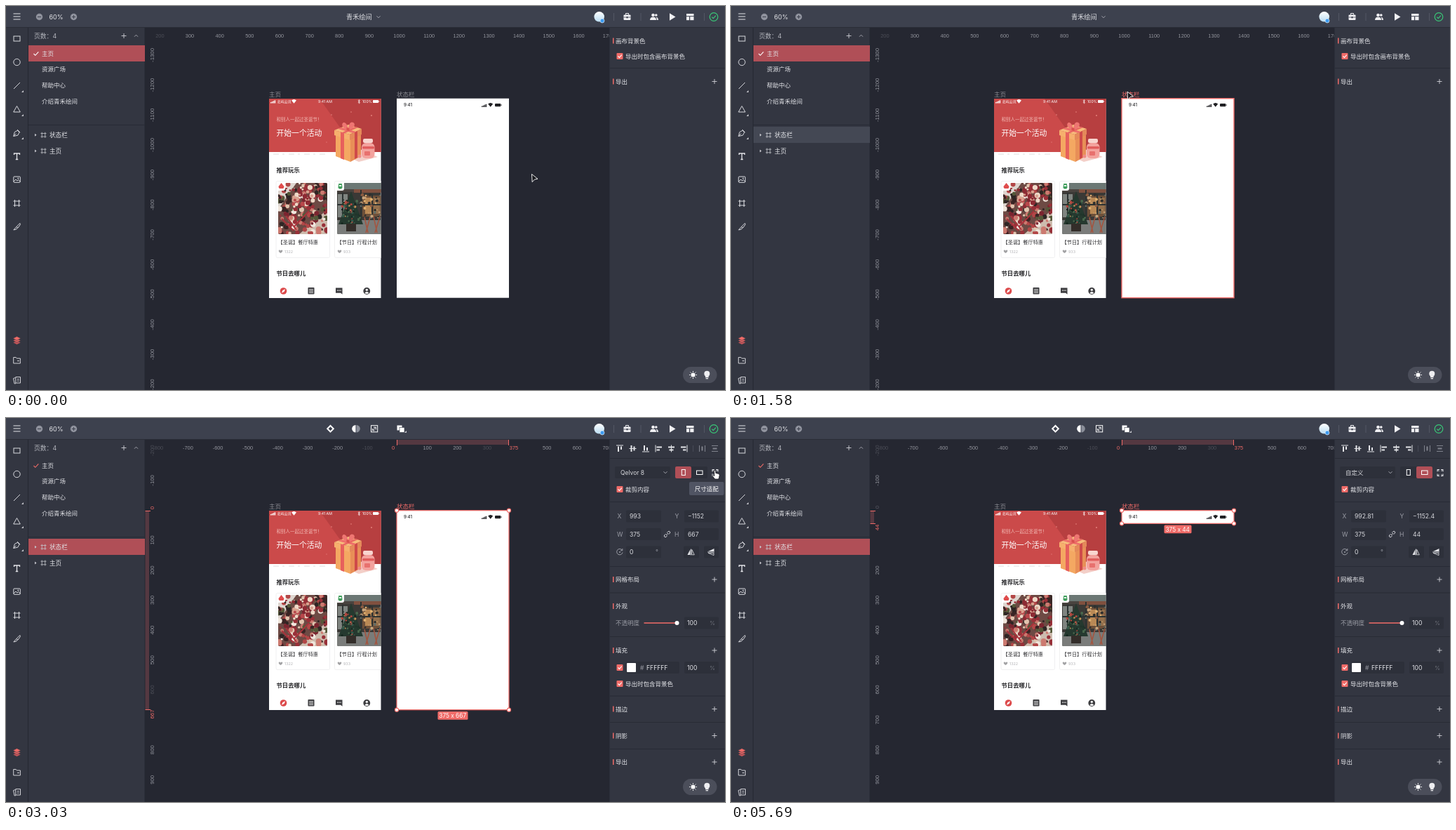
An HTML page that plays this animation: 1025 by 547 pixels, repeating every 5790 ms.

```html
<!DOCTYPE html>
<html lang="zh-CN">
<head>
<meta charset="utf-8">
<title>Design editor</title>
<style>
html, body { margin: 0; width: 100%; height: 100%; overflow: hidden; background: #252731; }
svg { display: block; width: 1025px; height: 547px; }
text { font-family: Inter, "Noto Sans CJK SC", "Noto Sans CJK", sans-serif; white-space: pre; }
.ruler text { font-family: "Liberation Sans", sans-serif; }
</style>
</head>
<body>
<svg id="stage" viewBox="0 0 1025 547"></svg>
<script>
const LOOP = 5790;
const RED = '#f06b68', ROW = '#b04f57', PANEL = '#333641', FIELD = '#2d303a';
const LIGHT = '#e3e4e8', MUTED = '#9a9ca5', EDGE = '#252832', BAND = '#553841';

const rect = (x, y, w, h, fill, extra = '') =>
  `<rect x="${x}" y="${y}" width="${w}" height="${h}" fill="${fill}" ${extra}/>`;
const circle = (x, y, r, fill, extra = '') => `<circle cx="${x}" cy="${y}" r="${r}" fill="${fill}" ${extra}/>`;
const shape = (d, fill, extra = '') => `<path d="${d}" fill="${fill}" ${extra}/>`;
const line = (d, color = LIGHT, width = 1, extra = '') =>
  `<path d="${d}" fill="none" stroke="${color}" stroke-width="${width}" ${extra}/>`;
const text = (x, y, s, size = 8.5, fill = LIGHT, extra = '') =>
  `<text x="${x}" y="${y + size * 0.37}" font-size="${size}" fill="${fill}" ${extra}>${s}</text>`;
const group = (id, body, extra = '') => `<g id="${id}" ${extra}>${body}</g>`;
const at = (x, y, body, extra = '') => `<g transform="translate(${x} ${y})" ${extra}>${body}</g>`;
const MID = 'text-anchor="middle"', BOLD = 'font-weight="600"', MEDIUM = 'font-weight="500"';

const plus = (x, y) => line(`M${x - 3.5} ${y}h7M${x} ${y - 3.5}v7`, '#d0d1d6', 0.9);
const chevron = (x, y, dir = 1) => line(`M${x - 2.5} ${y - dir * 1.2}l2.5 ${dir * 2.5}l2.5 ${-dir * 2.5}`, '#b0b2ba', 0.9);
const check = (x, y) => rect(x - 4.5, y - 4.5, 9, 9, RED, 'rx="1"') + line(`M${x - 2.5} ${y}l2 2l3.2-3.8`, '#fff', 1.1);
const field = (x, y, w) => rect(x, y - 8.5, w, 17, FIELD, 'rx="2"');
const rule = y => rect(861, y, 164, 1, '#282b35');
const section = (y, name, add = true) =>
  rect(865, y - 4, 1.5, 8, RED) + text(869, y, name, 8.5) + (add ? plus(1010, y) : '');

// Ruler labels; `place` maps a design unit to a stage coordinate.
function ruler(from, to, place, vertical, dim = [], skip = []) {
  let out = '';
  for (let n = from; n <= to; n += 100) {
    if (skip.includes(n)) continue;
    const fade = `opacity="${dim.includes(n) ? 0.35 : 1}"`;
    out += rulerLabel(place(n), n, vertical, '#92949c', fade);
  }
  return out;
}
function rulerLabel(p, n, vertical, fill, extra = '') {
  return vertical
    ? `<g transform="translate(208.5 ${p}) rotate(-90)">${text(0, 0, n, 7.8, fill, MID + extra)}</g>`
    : text(p, 42, n, 7.4, fill, MID + extra);
}

const SCALE = 0.4265;
const rulers =
  group('rulersPage',
    ruler(200, 1700, n => 262 + (n - 300) * SCALE, false, [200]) +
    ruler(-1300, -200, n => 70 + (n + 1300) * SCALE, true), 'class="ruler"') +
  group('rulersFrame',
    rect(557, 31, 160, 7, BAND) + line('M557.5 31v8M716.5 31v8', RED) +
    ruler(-800, 700, n => 558 + n * SCALE, false, [-800, -100, 300], [0, 400]) +
    rulerLabel(552, 0, false, RED) + rulerLabel(724, 375, false, RED) +
    ruler(-200, 900, n => 131.5 + n * SCALE, true, [-200, 600], [0, 100, 600, 700]), 'class="ruler"') +
  group('rulerTall',
    rect(198, 132, 6, 284, BAND) + line('M198 132.5h8M198 415.5h8', RED) +
    rulerLabel(128, 0, true, RED) + rulerLabel(174, 100, true, '#92949c') +
    rulerLabel(387, 600, true, '#92949c', 'opacity=".35"') + rulerLabel(422, 667, true, RED), 'class="ruler"') +
  group('rulerShort',
    rect(198, 132, 6, 18.5, BAND) + line('M198 132.5h8M198 150.5h8', RED) +
    rulerLabel(127, 0, true, '#92949c', 'opacity=".45"') + rulerLabel(156, 44, true, RED) +
    rulerLabel(387, 600, true, '#92949c') + rulerLabel(430, 700, true, '#92949c'), 'class="ruler"');

function seeded(seed) {
  return () => (seed = seed * 16807 % 2147483647) / 2147483647;
}
function blobs(seed, count, x, y, w, h, radius, colors) {
  const rnd = seeded(seed);
  let out = '';
  for (let i = 0; i < count; i++)
    out += circle((x + rnd() * w).toFixed(1), (y + rnd() * h).toFixed(1),
      (radius * (0.5 + rnd())).toFixed(1), colors[Math.floor(rnd() * colors.length)]);
  return out;
}

const signal = (x, y, c) => [0, 1, 2, 3].map(i => rect(x + i * 1.9, y + 2 - i * 0.9, 1.4, 1.5 + i * 0.9, c)).join('');
const wifi = (x, y, c) => shape(`M${x - 3.5} ${y - 1.5}q3.5-3 7 0L${x} ${y + 2.8}z`, c);
const heart = (x, y) => shape(`M${x} ${y + 2.5}c-5-3-2-6.3 0-3.6c2-2.7 5 .6 0 3.6z`, '#a3a3a5');

const gift =
  shape('M474 209l24-8l32 14l-27 7z', '#f3cfc8') +
  shape('M470 183l21 7v32l-21-8z', '#f4a862') + shape('M491 190l15-7v31l-15 8z', '#e88f57') +
  shape('M468 177l20-8l19 6l-17 8z', '#f7bd7c') +
  shape('M468 177l22 6v8l-22-7z', '#f6b06d') + shape('M490 183l17-8v8l-17 8z', '#e4895a') +
  shape('M477 179.5l5 1.5v38l-5-2z', '#e7605c') + shape('M497 180l4-2v38l-4 2z', '#cf4a4a') +
  shape('M473 175l5-2l21 6l-4 2z', '#ee6f6a') + shape('M498 172l4 1l-21 9l-4-1z', '#e86762') +
  shape('M488 176c-8 0-11-8-7-10c4-1 6 5 7 9c1-7 3-11 7-9c5 3-1 10-7 10z', '#ee7672') +
  shape('M485.5 173l4 1v4l-4-1z', '#d9504e') +
  rect(507, 195, 18.5, 22, '#f3a29d', 'rx="6"') + rect(509, 189, 14, 6, '#f8d5cf', 'rx="2"') +
  rect(508, 200, 17, 3.5, '#e15e5d', 'rx="1.5"') + rect(511, 207, 8, 6, '#e8716e', 'rx="1"') +
  circle(504, 214, 2.5, '#ef8c86');

const foodPhoto = `<g clip-path="url(#foodClip)">` +
  rect(388, 252, 70, 73, '#6d4a44') + shape('M388 252h26l-26 38z', '#ded6d0') +
  shape('M458 290v35h-40z', '#cdbcae') + shape('M440 252h18v26z', '#3b2a28') +
  blobs(31, 210, 388, 252, 70, 73, 2.6,
    ['#7b2530', '#b34747', '#3a2424', '#e0c4ae', '#555839', '#cc7a70', '#f0e6dc', '#2e2524', '#983038']) +
  blobs(77, 34, 410, 258, 28, 28, 2.8, ['#d9a28f', '#b8474b', '#efd9c8', '#8d2a33']) +
  line('M393 303l17 17M399 299l15 20M411 314l21-22', '#a9323b', 2) + '</g>';

const shopPhoto = `<g clip-path="url(#shopClip)">` +
  rect(472, 252, 63, 73, '#3b3936') + rect(472, 252, 63, 9, '#6b7774') + rect(472, 261, 63, 4, '#4a4440') +
  rect(496, 261, 39, 5, '#80503f') + rect(473, 268, 14, 33, '#7f8480') + rect(508, 270, 27, 30, '#6e5039') +
  rect(512, 273, 9, 23, '#b98955') + rect(524, 273, 9, 23, '#94704d') +
  line('M480 266v38M506 262v44M522 268v34M472 283h63', '#2c3232', 2) +
  blobs(19, 40, 506, 268, 29, 34, 1.5, ['#e0b070', '#2e2f2e', '#8a5b42', '#5d6c68', '#c9a57c']) +
  rect(472, 305, 63, 20, '#7a7c7a') +
  line('M511 301l5 22M519 301l-6 22M524 300l5 23M533 300l-7 23', '#a35540', 1.6) +
  shape('M492 264l-18 47h35z', '#25392f') +
  blobs(57, 80, 479, 276, 26, 36, 1.3, ['#36594a', '#b8473f', '#16261f', '#c98f58', '#4b6a4e', '#20342a']) +
  rect(485, 310, 14, 11, '#332d29') + '</g>';

const navIcons =
  circle(395.5, 406, 4.8, '#dc4a4b') + shape('M398.2 403.3l-1.6 3.8l-3.8 1.6l1.6-3.8z', '#fff') +
  rect(430.5, 401, 9, 9.5, '#3d3d40', 'rx=".8"') + line('M432 403.8h6M432 406h6M432 408.2h6', '#fff', 0.9) +
  shape('M470 401.5h9.5v9.2l-2.4-2h-7.1z', '#3d3d40') + line('M472 405.2h1.3M474.2 405.2h1.3M476.4 405.2h1.3', '#fff', 1.2) +
  circle(514.3, 406, 4.9, '#3d3d40') + circle(514.3, 404.3, 1.6, '#fff') + shape('M511.3 408.9q3-3.6 6 0q-3 2-6 0z', '#fff');

const phone = `<g clip-path="url(#phoneClip)">` +
  rect(375, 132, 160, 284, '#fff') + rect(375, 132, 160, 76, '#cb4a4a') +
  shape('M447 132H535V208H501z', '#b73f40') +
  circle(464, 155, 0.8, '#e98a82') + circle(521, 156, 0.9, '#e98a82') + circle(457, 194, 0.8, '#e0716e') + circle(492, 151, 0.8, '#e98a82') +
  line('M381 211h79', '#d9d5d5', 0.8, 'stroke-dasharray="8 5 3 6"') +
  signal(377, 135, '#fff') + text(386.5, 136.2, '北屿云讯', 5, '#fff', MEDIUM) + wifi(410.5, 136, '#fff') +
  text(455, 136.3, '9:41 AM', 5.2, '#fff', MID) + line('M502 134l2.5 4l-1.2 1v-5.5l1.2 1l-2.5 3.5', '#fff', 0.6) +
  text(508, 136.3, '100%', 5.2, '#fff') + rect(523, 134, 8, 4, '#fff', 'rx=".8"') + rect(531.4, 135.2, 0.8, 1.6, '#fff') +
  text(385.5, 162, '和别人一起过圣诞节！', 6.5, '#f2b9b3') + text(385.5, 181, '开始一个活动', 10.8, '#fff', MEDIUM) + gift +
  text(385.5, 234, '推荐玩乐', 8.3, '#28282b', BOLD) +
  rect(385, 249.5, 76.5, 109, '#fff', 'rx="2" stroke="#ececee" stroke-width=".8"') +
  rect(468.5, 249.5, 76.5, 109, '#fff', 'rx="2" stroke="#ececee" stroke-width=".8"') +
  foodPhoto + shopPhoto +
  shape('M387 251h11v9q0 3-3 3h-8z', '#fff') + shape('M392.5 252l4 5q0 2-1.3 3h-5.4q-1.3-1-1.3-3z', '#df4c4c') +
  shape('M471 251h11v9q0 3-3 3h-8z', '#fff') + shape('M474.3 253h4.5l.7 5.5l-1.3 2h-3.4l-1.3-2z', '#3f9d5b') + rect(475, 255, 3, 2, '#fff') +
  text(387.5, 336.5, '【圣诞】餐厅特惠', 7.2, '#303033') + text(471.5, 336.5, '【节日】行程计划', 7.2, '#303033') +
  heart(391.5, 349.5) + text(397, 350, '1322', 5.4, '#b2b2b5') + heart(475.5, 349.5) + text(481, 350, '933', 5.4, '#b2b2b5') +
  text(385.5, 381, '节日去哪儿', 8.4, '#28282b', BOLD) + navIcons + '</g>';

const FRAME = { x: 557, y: 131.7, w: 160, tall: 284, short: 18.6 };
const outline = (h, width) => rect(FRAME.x, FRAME.y, FRAME.w, h, 'none', `stroke="${RED}" stroke-width="${width}"`);
function selection(h, size, badgeWidth) {
  const { x, y, w } = FRAME;
  const handles = [[x, y], [x + w, y], [x, y + h], [x + w, y + h]];
  return outline(h, 1.2) +
    handles.map(([cx, cy]) => circle(cx, cy, 2.6, '#fff', `stroke="${RED}" stroke-width="1.1"`)).join('') +
    rect(x + w / 2 - badgeWidth / 2, y + h + 2.3, badgeWidth, 11.7, RED, 'rx="1.5"') +
    text(x + w / 2 - 0.3, y + h + 8.2, size, 8.3, '#fff', MID);
}

const artboards =
  text(375, 126, '主页', 8.5, '#898a91') + phone +
  text(557, 126, '状态栏', 8.5, '#898a91', 'id="frameName"') +
  rect(FRAME.x, FRAME.y, FRAME.w, FRAME.tall, '#fff', 'id="frameBox"') +
  text(567, 141.2, '9:41', 6, '#202023', MEDIUM) +
  signal(678, 140.5, '#202023') + wifi(690.7, 141, '#202023') +
  rect(697, 139, 8.3, 4.3, '#202023', 'rx="1"') + rect(705.7, 140.2, 0.8, 1.8, '#202023') +
  group('hoverBar', outline(FRAME.short, 1.4)) + group('hoverFrame', outline(FRAME.tall, 1.4)) +
  group('pickTall', selection(FRAME.tall, '375 x 667', 43)) + group('pickShort', selection(FRAME.short, '375 x 44', 39));

const corner = (x, y) => shape(`M${x} ${y}v-3l-3 3z`, '#c9cad0');
const tools =
  rect(0, 31, 31, 516, PANEL) + rect(31, 31, 1, 516, EDGE) +
  rect(11, 43, 9, 7, 'none', 'stroke="#d8d9de"') + circle(15.5, 80, 4.7, 'none', 'stroke="#d8d9de"') +
  line('M11 118l9-9', '#d8d9de') + corner(25, 123) + line('M15.5 142.5l4.8 8.5h-9.6z', '#d8d9de') + corner(25, 157) +
  line('M10.8 185.5l1.5-6l4.2-2.2l2.6 2.6l-2.2 4.2zM10.8 185.5l3.6-3.7M16 176l4.2 4.2', '#d8d9de') + corner(25, 190) +
  line('M11.5 212v-2h8v2M15.5 210v8.5M13.8 218.5h3.4', LIGHT, 1.3) +
  rect(10.8, 243, 9.5, 8.3, 'none', 'rx="1" stroke="#d8d9de"') + line('M11 250l3-3l2 2l1.5-1.5l2.8 2.8', '#d8d9de') + circle(17.3, 245.5, 0.9, '#d8d9de') +
  line('M12.5 276v10M18.5 276v10M10.5 278h10M10.5 284h10', '#d8d9de') +
  line('M10.8 319l5-5.5l4-4l.6 1.8l-3.4 4.8l-2-1.5M10.8 319l4-1l1.5-2', '#d8d9de') +
  [483, 480, 477].map((y, i) => shape(`M10 ${y - 3.5}l5.5-2.8l5.5 2.8l-5.5 2.8z`, ['#c9565a', '#dd6262', RED][i], `stroke="${PANEL}" stroke-width=".5"`)).join('') +
  line('M10.7 500.5h3.5l1.2 1.5h5v7h-9.7zM16 505.5h3', '#d0d1d6') +
  line('M13.8 528.5h6.7v8.5h-6.7zM13.5 529.5l-3 1l1.6 7.5l2-.4M16 531.5h2.5M16 534h2.5', '#d0d1d6');

const pageNames = ['主页', '资源广场', '帮助中心', '介绍青禾绘间'];
const layer = (y, name) =>
  shape(`M41 ${y - 2}l2.6 2l-2.6 2z`, '#c5c6cc') +
  line(`M51.2 ${y - 4}v8M55.8 ${y - 4}v8M49.5 ${y - 2.3}h8M49.5 ${y + 2.3}h8`, '#c5c6cc', 0.8) + text(62, y, name, 8.6);
const leftPanel =
  rect(32, 31, 166, 516, PANEL) + rect(197.5, 31, 1, 516, EDGE) +
  text(40, 42.5, '页数：4', 8.8, '#b5b7be') + plus(168, 42.5) + chevron(185.5, 42.5, -1) +
  group('pageRow', rect(32, 56, 166, 23, ROW)) +
  group('layerHover', rect(32, 172, 166, 23, '#444854')) + group('layerRow', rect(32, 172, 166, 23, ROW)) +
  group('tickWhite', line('M39.5 68l2.3 2.3l4.5-5', '#fff', 1.1)) + group('tickRed', line('M39.5 68l2.3 2.3l4.5-5', RED, 1.1)) +
  pageNames.map((name, i) => text(51, 67.5 + i * 22.8, name, 8.5)).join('') +
  rect(32, 169, 166, 1, '#282b35') + layer(183.8, '状态栏') + layer(206.5, '主页');

const topBar =
  rect(0, 0, 1025, 31, '#3d414e') + rect(0, 30, 1025, 1, '#2a2d37') +
  line('M10.5 11h10M10.5 15h10M10.5 19h10') +
  circle(47.5, 15.5, 4.7, '#8f929d') + line('M45 15.5h5', '#3d414e') + text(71.5, 15.5, '60%', 9, LIGHT, MID) +
  circle(96.5, 15.5, 4.7, '#8f929d') + line('M94 15.5h5M96.5 13v5', '#3d414e') +
  group('docTitle', text(485, 15.5, '青禾绘间', 9.2) + chevron(531, 15.5)) +
  group('frameTools',
    line('M462.5 11l4.3 4.3l-4.3 4.3l-4.3-4.3z', '#fff', 2) +
    shape('M498.5 10a5.3 5.3 0 0 0 0 10.6z', '#fff') + shape('M499.5 10a5.3 5.3 0 0 1 0 10.6z', '#8a8e99') +
    rect(520.5, 10.7, 9.2, 9.2, 'none', 'stroke="#fff"') + line('M524 13.2h3.3v3.3M522.6 15v2.8h2.8M526.8 13.6l-3.8 3.8', '#fff', 0.9) +
    rect(557.5, 10.5, 7, 7, '#fff') + rect(561, 13.5, 7, 7, '#fff', 'stroke="#3d414e" stroke-width=".6"') + corner(571, 21)) +
  circle(845.7, 15.3, 7.3, 'url(#avatar)') + circle(850, 21, 3, '#3d9bf0', 'stroke="#fff" stroke-width=".6"') +
  line('M866.5 10v11M905 10v11M995.5 10v11', '#535764') +
  rect(880.5, 12.5, 10, 7.5, '#f0f0f3', 'rx="1"') + line('M883.5 12.5v-2h4v2', '#f0f0f3') + line('M880.5 16h10', '#3d414e', 0.8) + rect(884.5, 15, 2, 2.4, '#3d414e') +
  circle(922.5, 13, 2.3, '#f0f0f3') + shape('M918 20q0-4.3 4.5-4.3t4.5 4.3z', '#f0f0f3') +
  circle(926.8, 13, 1.8, '#f0f0f3') + shape('M927.8 20q0-3-1.2-4.2q3.3.3 3.3 4.2z', '#f0f0f3') +
  shape('M946 10.3l8.5 5.2l-8.5 5.2z', '#f0f0f3') +
  rect(970, 11, 10.5, 3.2, '#f0f0f3') + rect(970, 15.2, 4, 5, '#f0f0f3') + rect(975.2, 15.2, 5.3, 5, '#f0f0f3') +
  circle(1009, 15.5, 5.8, 'none', 'stroke="#39c777" stroke-width="1.2"') + line('M1006.2 15.6l2 2l3.8-4', '#39c777', 1.2);

// Each alignment icon: its axis, then the bars lined up on it.
const alignments = [
  ['M-5-4.5h10', 'M-2-3v7.5M2-3v4.5'], ['M-5 0h10', 'M-2-4.5v9M2-3v6'], ['M-5 4.5h10', 'M-2-4.5v7.5M2-1.5v4.5'],
  ['M-4.5-5v10', 'M-3-2h7.5M-3 2h4.5'], ['M0-5v10', 'M-4.5-2h9M-3 2h6'], ['M4.5-5v10', 'M-4.5-2h7.5M-1.5 2h4.5'],
  ['M-4-4.5v9M4-4.5v9', 'M0-3v6'], ['M-4.5-4h9M-4.5 4h9', 'M-3 0h6']];
const alignIcons = alignments.map(([axis, bars], i) => {
  const color = i < 6 ? LIGHT : '#80838d';
  return at([875, 893.5, 912, 930.5, 948.5, 966.5, 992.5, 1010.5][i], 43.5, line(axis, color) + line(bars, color, 2));
}).join('');

const number = (x, y, name, boxX, w, id, value) =>
  text(x, y, name, 8.6, MUTED) + field(boxX, y, w) + text(boxX + 5, y, value, 8.6, '#d6d7dc', `id="${id}"`);
const percent = y => field(967, y, 49) + text(971, y, '100', 8.6) + text(1003, y, '%', 8.2, '#6c6f79');

const rightPanel =
  rect(860, 31, 165, 516, PANEL) + rect(859.5, 31, 1, 516, EDGE) +
  group('pageProps', section(49.5, '画布背景色', false) + check(875, 71.5) + text(883, 71.5, '导出时包含画布背景色', 8.5) + rule(88) + section(107.5, '导出')) +
  group('frameProps',
    alignIcons + line('M979.5 39v9', '#474a56') + rule(57) +
    field(868, 77.5, 79) + text(876, 77.5, '', 8.5, '#d6d7dc', 'id="preset"') + chevron(940, 77.5) +
    rect(954, 69, 46, 17, FIELD, 'rx="2"') + rect(954, 69, 23, 17, ROW, 'rx="2" id="orientation"') +
    rect(963.3, 73.5, 5, 8, 'none', 'stroke="#fff"') + rect(984.5, 75, 8.5, 5.5, 'none', 'stroke="#fff"') +
    line('M1007 76.5v-3h3M1012 73.5h3v3M1015 79.5v3h-3M1010 82.5h-3v-3M1007 73.5l2.5 2.5M1015 73.5l-2.5 2.5M1007 82.5l2.5-2.5M1015 82.5l-2.5-2.5') +
    check(875, 101.5) + text(883, 101.5, '裁剪内容', 8.5) + rule(119) +
    number(871.5, 140, 'X', 884, 50, 'xValue', '') + number(953.5, 140, 'Y', 967, 49, 'yValue', '') +
    number(871, 165.5, 'W', 884, 50, 'wValue', '375') + number(953, 165.5, 'H', 967, 49, 'hValue', '') +
    at(942.5, 165.5, line('M-1.5 1.5l3-3M-.3-2l1.7-1.7a1.6 1.6 0 0 1 2.3 2.3l-1.7 1.7M.3 2l-1.7 1.7a1.6 1.6 0 0 1-2.3-2.3l1.7-1.7', '#d8d9de')) +
    line('M878.5 188.5a4.2 4.2 0 1 0 .5 3M878.8 186v2.8h-2.8', MUTED) + circle(875, 191, 1, MUTED) +
    field(884, 191, 50) + text(889, 191, '0', 8.6) + text(926, 190.5, '°', 8.6, MUTED) +
    field(966, 191, 22) + line('M976.5 186.5v9', LIGHT, 0.8) + shape('M975.5 187v8h-4z', LIGHT) + line('M977.8 187.5v7.3h3.5z', LIGHT, 0.8) +
    field(995, 191, 21) + line('M1000 191h10', LIGHT, 0.8) + shape('M1001 190h8.5v-4z', LIGHT) + line('M1001 192.3h8v3.3z', LIGHT, 0.8) +
    rule(211) + section(230, '网格布局') + rule(248.5) + section(268, '外观', false) +
    text(869, 292, '不透明度', 8.5, MUTED) + line('M909.5 292h47', RED, 1.4) + circle(956.5, 292, 3, '#fff') + percent(292) +
    rule(311) + section(331, '填充') + check(875, 355.5) + field(884, 355.5, 76) + rect(885, 349, 13, 13, '#fff', 'rx="1"') +
    text(904, 355.5, '#', 8.6, MUTED) + text(913, 355.5, 'FFFFFF', 8.6) + percent(355.5) +
    check(875, 378.5) + text(883, 378.5, '导出时包含背景色', 8.5) + rule(395.5) +
    section(414.5, '描边') + rule(433) + section(452.5, '阴影') + rule(471) + section(490, '导出')) +
  rect(965, 514, 48.5, 23, '#4b4e5a', 'rx="11.5"') +
  circle(979.5, 525.5, 3, '#fff') +
  at(979.5, 525.5, line('M0-5.5v1.5M0 5.5v-1.5M-5.5 0h1.5M5.5 0h-1.5M-3.9-3.9l1 1M3.9 3.9l-1-1M-3.9 3.9l1-1M3.9-3.9l-1 1', '#fff')) +
  circle(999.3, 523.7, 4, '#eeeef1') + shape('M997 526h4.6v3.2h-4.6z', '#eeeef1') + rect(997.6, 530, 3.4, 1.3, '#eeeef1') +
  group('tip', rect(974, 91, 49.5, 19, '#505463', 'rx="2"') + text(998.7, 100.5, '尺寸适配', 8.5, '#fff', MID));

const pointers =
  group('arrow', shape('M.5.5L9 7.3L4.6 8L1.2 11.7z', '#17181d', 'stroke="#fff" stroke-width=".9" stroke-linejoin="round"')) +
  group('hand', shape('M3 .8q1.5-1 2 .6l.4 3.2l3.6.8q1.8.5 1.6 2.4l-.8 3.8l-.8 1.4h-4.8l-3.2-4q-1-1.6.4-1.7l2.1 1.2z', '#fff', 'stroke="#17181d" stroke-width=".7"'),
    'transform="translate(1006.5 74)"');

document.getElementById('stage').innerHTML = `<defs>
  <clipPath id="phoneClip">${rect(375, 132, 159.5, 284, '#fff')}</clipPath>
  <clipPath id="foodClip">${rect(388, 252, 70, 73, '#fff', 'rx="2"')}</clipPath>
  <clipPath id="shopClip">${rect(472, 252, 70, 73, '#fff', 'rx="2"')}</clipPath>
  <linearGradient id="avatar" x2="0" y2="1"><stop stop-color="#fff"/><stop offset="1" stop-color="#b9dcf2"/></linearGradient>
</defs>` + rect(0, 0, 1025, 547, '#252731') + rulers + artboards + tools + leftPanel + rightPanel + topBar + pointers;

const el = id => document.getElementById(id);
const show = (on, ...ids) => ids.forEach(id => el(id).setAttribute('display', on ? 'inline' : 'none'));
const write = (id, value) => { if (el(id).textContent !== value) el(id).textContent = value; };

// Pointer stops: time, x, y.
const stops = [
  [0, 749, 239], [300, 738, 235], [540, 736, 232], [680, 607, 167], [830, 574, 148], [980, 564.5, 126.5],
  [1130, 564.5, 121.5], [1900, 785, 82], [2130, 975, 60], [2280, 998, 70], [2430, 1007, 74],
  [4380, 999, 99], [4590, 973, 281], [4740, 1011, 435], [4880, 1015, 505]];

function update(t) {
  const picked = t >= 1750, fitted = t >= 3930;
  const hovering = t >= 1130 && !picked;
  show(!picked, 'rulersPage', 'docTitle', 'pageProps', 'pageRow', 'tickWhite');
  show(picked, 'rulersFrame', 'frameTools', 'frameProps', 'layerRow', 'tickRed');
  show(picked && !fitted, 'rulerTall', 'pickTall');
  show(fitted, 'rulerShort', 'pickShort');
  show(t >= 980 && t < 1130, 'hoverBar');
  show(hovering, 'hoverFrame', 'layerHover');
  show(t >= 3030 && !fitted, 'tip');

  el('frameName').setAttribute('fill', t >= 1130 ? RED : '#898a91');
  el('frameBox').setAttribute('height', fitted ? FRAME.short : FRAME.tall);
  el('orientation').setAttribute('x', fitted ? 977 : 954);
  write('preset', fitted ? '自定义' : 'Qelvor 8');
  write('xValue', fitted ? '992.81' : '993');
  write('yValue', fitted ? '−1152.4' : '−1152');
  write('hValue', fitted ? '44' : '667');

  const pointing = t >= 2580 && t < 4380;
  const [, x, y] = stops.findLast(stop => stop[0] <= t);
  show(pointing, 'hand');
  show(!pointing && t < 5030, 'arrow');
  el('arrow').setAttribute('transform', `translate(${x} ${y})`);
}

function tick() {
  update(performance.now() % LOOP);
  requestAnimationFrame(tick);
}
tick();
</script>
</body>
</html>
```
